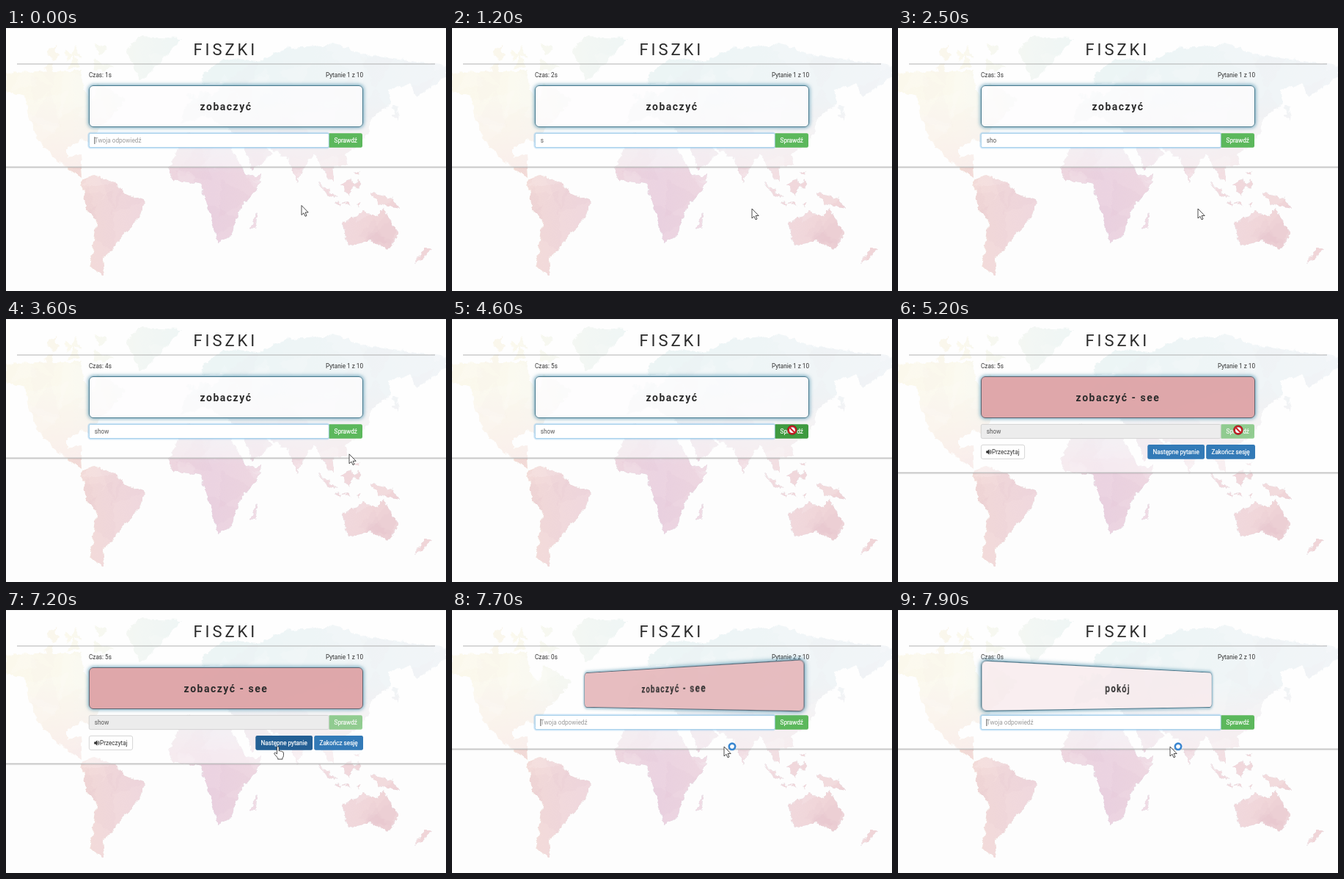
An HTML page that plays this animation: 600x358 px, repeating every 8 s.

```html
<!DOCTYPE html>
<html lang="pl">
<head>
<meta charset="utf-8">
<title>Fiszki</title>
<style>
html, body { margin: 0; width: 100%; height: 100%; overflow: hidden; background: #fdfdfd; }
#stage { position: relative; width: 600px; height: 358px; overflow: hidden; }
svg { position: absolute; left: 0; top: 0; }
text { font: 8.2px Roboto, sans-serif; fill: #333; }
.btn text { fill: #fff; stroke: #fff; stroke-width: .2; text-anchor: middle; }
#scene { position: absolute; left: 113px; top: 78.3px; width: 374px; height: 56.7px;
  perspective: 585px; perspective-origin: 50% 43px; }
#card { box-sizing: border-box; width: 100%; height: 100%; border: 1.2px solid; border-radius: 6px;
  box-shadow: 0 0 5px 1px rgba(70, 140, 170, .75); text-align: center; white-space: pre;
  font: 700 14px/56px Roboto, sans-serif; letter-spacing: 1.5px; color: #2c2c2c; }
</style>
</head>
<body>
<div id="stage">
  <svg width="600" height="358">
    <defs>
      <linearGradient id="north">
        <stop offset="0" stop-color="#f8f2d8"/><stop offset=".14" stop-color="#f7f3dc"/>
        <stop offset=".3" stop-color="#e6efe8"/><stop offset=".48" stop-color="#d8ebec"/>
        <stop offset="1" stop-color="#e4ebf1"/>
      </linearGradient>
      <linearGradient id="south">
        <stop offset=".1" stop-color="#f5ddd6"/><stop offset=".25" stop-color="#f1d9dc"/>
        <stop offset=".47" stop-color="#ebd3e1"/><stop offset=".7" stop-color="#f1dbe0"/>
        <stop offset=".85" stop-color="#f0d5d8"/>
      </linearGradient>
      <linearGradient id="fade" x2="0" y2="1">
        <stop offset=".28" stop-color="#000"/><stop offset=".55" stop-color="#fff"/>
      </linearGradient>
      <mask id="low"><rect width="600" height="358" fill="url(#fade)"/></mask>
      <clipPath id="land"></clipPath>
      <filter id="coast" x="0" y="0" width="600" height="358" filterUnits="userSpaceOnUse" color-interpolation-filters="sRGB">
        <feTurbulence type="fractalNoise" baseFrequency=".11" numOctaves="3" seed="4"/>
        <feDisplacementMap in="SourceGraphic" scale="8" xChannelSelector="R" yChannelSelector="G"/>
      </filter>
    </defs>
    <g filter="url(#coast)"><g clip-path="url(#land)">
      <rect width="600" height="358" fill="url(#north)"/>
      <rect width="600" height="358" fill="url(#south)" mask="url(#low)"/>
      <g id="facets"></g>
    </g></g>
  </svg>

  <svg width="600" height="358">
    <rect id="panel" width="600" height="189" fill="#fff" fill-opacity=".52"/>
    <path d="M0 .5H600" stroke="#f1f1f1"/>
    <g id="edge">
      <rect y="-.4" width="600" height="1.2" fill="#bbb"/>
      <rect y=".8" width="600" height="1.4" fill="#777" fill-opacity=".16"/>
    </g>
    <text x="255.5" y="37" style="font-size:22px;letter-spacing:3.9px;fill:#2b2b2b">FISZKI</text>
    <path d="M15 49H585" stroke="#a9a9a9" stroke-width=".9"/>
    <text id="timer" x="113" y="66.9"></text>
    <text id="count" x="487" y="66.9" text-anchor="end"></text>

    <rect id="glow" x="112.5" y="142.6" width="328" height="20.6" rx="3" fill="none" stroke="#66afe9" stroke-opacity=".28" stroke-width="2.4"/>
    <rect id="field" x="113.3" y="143.4" width="327" height="19.2" rx="2" stroke-width=".8"/>
    <text id="answer" x="120.8" y="156"></text>
    <path id="caret" d="M120.9 148.3V158" stroke="#333" stroke-width=".8"/>
    <g id="check" class="btn">
      <path id="checkBox" d="M440.7 143.2H483.7a2.3 2.3 0 0 1 2.3 2.3V160.5a2.3 2.3 0 0 1-2.3 2.3H440.7Z"/>
      <text x="463.2" y="155.8">Sprawdź</text>
    </g>

    <g id="extra">
      <rect x="113.4" y="171.4" width="59.2" height="19" rx="2.4" fill="#fff" stroke="#ccc" stroke-width=".8"/>
      <path d="M120.2 179.5h1.8l2.5-2.2v7.4l-2.5-2.2h-1.8Z" fill="#333"/>
      <path d="M125.3 179.4q1.2 1.6 0 3.2M126.2 178q2.3 3 0 6" fill="none" stroke="#333" stroke-width=".8"/>
      <text x="128" y="184">Przeczytaj</text>
      <g class="btn">
        <rect id="next" x="340.3" y="171" width="77.8" height="19.8" rx="2.4"/>
        <text x="379.2" y="184">Następne pytanie</text>
        <rect x="420.2" y="171" width="66.8" height="19.8" rx="2.4" fill="#337ab7"/>
        <text x="453.6" y="184">Zakończ sesję</text>
      </g>
    </g>

    <g id="cursor">
      <path id="arrow" d="M0 0V13L3 10.3 5 14.8 7 14 5.1 9.5H9.2Z" fill="#fff" stroke="#222" stroke-width=".8"/>
      <circle id="busy" cx="11" cy="-.2" r="4.2" fill="#fff" stroke="#3a86d0" stroke-width="2.6"/>
      <path id="hand" transform="translate(-6 -.5)" fill="#fff" stroke="#222" stroke-width=".8"
        d="M4.5 1.6a1.3 1.3 0 0 1 2.6 0V6.4q1.5-.8 2.4.5 1.5-.6 2.2.6 1.7-.2 1.8 1.4V12q0 2.4-1.5 4V17.6H5.7V16L1.2 10.8q-1.1-1.7.3-2.1 1.1-.2 3 1.8Z"/>
      <g id="stop" fill="none" transform="translate(.9 .2)">
        <circle r="5.3" fill="#fff" stroke="#5c1115" stroke-width="2.6"/>
        <circle r="5.3" stroke="#cf2228" stroke-width="1.9"/>
        <path d="M-3.7-3.7 3.7 3.7" stroke="#cf2228" stroke-width="2.1"/>
      </g>
    </g>
  </svg>
  <div id="scene"><div id="card"></div></div>
</div>

<script>
const $ = id => document.getElementById(id);
const set = (id, name, value) => $(id).setAttribute(name, value);
const show = (id, on) => set(id, 'visibility', on ? 'inherit' : 'hidden');
const put = (id, s) => { if ($(id).textContent !== s) $(id).textContent = s; };

let seed = 7;
const rand = (a, b) => {
  seed = seed * 16807 % 2147483647;
  return a + (b - a) * seed / 2147483647;
};

function polygon(parent, points, attrs = {}) {
  const el = document.createElementNS('http://www.w3.org/2000/svg', 'polygon');
  el.setAttribute('points', points);
  for (const k in attrs) el.setAttribute(k, attrs[k]);
  $(parent).append(el);
}

// Triangle with random corners around a centre
const triangle = (x, y, r) => {
  const a = rand(0, 6.28);
  return [0, 1, 2].map(i => {
    const b = a + i * 2.1 + rand(-.4, .4);
    return [x + r * Math.cos(b), y + r * Math.sin(b)];
  }).join(' ');
};

// Corner points only: the coast filter roughens the edges
const LAND = {
  northAmerica: '0,62 62,58 104,58 106,84 118,96 126,74 162,98 146,118 118,146 122,160 104,152 84,162 84,176 102,172 104,205 64,176 44,152 30,118 26,92 0,86',
  southAmerica: '104,207 120,200 146,210 160,224 189,235 180,262 165,276 146,300 131,314 133,337 115,325 124,262 108,244',
  greenland: '180,12 240,14 205,52 184,72 164,32',
  europe: '238,128 246,104 272,84 282,92 298,74 266,78 270,60 300,40 350,46 350,150 318,148 298,134 272,118 256,126',
  asia: '345,46 380,28 446,22 500,38 600,52 600,66 560,94 552,76 520,84 524,104 500,122 486,158 462,172 466,186 446,188 448,209 440,204 420,172 402,196 398,210 384,176 350,158 364,170 336,194 318,146',
  africa: '222,190 245,143 300,151 328,202 347,200 345,213 319,246 308,282 288,293 276,243 264,212 228,207',
  madagascar: '344,249 340,273 332,272',
  australia: '460,266 488,249 505,257 514,246 534,280 522,302 498,290 465,297',
  newGuinea: '496,224 526,232 537,245 508,239',
  borneo: '455,213 470,206 474,214 467,228',
  sumatra: '426,209 451,231 436,225',
  newZealand: '571,298 581,303 557,321'
};
Object.values(LAND).forEach(p => polygon('land', p));

function isles(n, x, y, w, h, r) {
  for (let i = 0; i < n; i++) polygon('land', triangle(x + rand(0, w), y + rand(0, h), rand(.5, 1) * r));
}
isles(9, 60, 24, 85, 34, 13);    // Arctic
isles(7, 448, 236, 38, 5, 4);    // Java
isles(6, 470, 188, 12, 36, 5);   // Philippines
isles(4, 530, 100, 4, 22, 6);    // Japan
isles(3, 250, 88, 8, 12, 6);     // Britain

for (let i = 0; i < 70; i++) {
  const light = i % 2;
  polygon('facets', triangle(rand(0, 600), rand(30, 320), rand(20, 45)),
    { fill: light ? '#fff' : '#a58', 'fill-opacity': light ? .13 : .025 });
}

// CSS "ease" curve
function ease(x) {
  if (x <= 0) return 0;
  if (x >= 1) return 1;
  const bez = (a, b, u) => 3 * a * u * (1 - u) ** 2 + 3 * b * u * u * (1 - u) + u ** 3;
  let lo = 0, hi = 1;
  for (let i = 0; i < 24; i++) {
    const mid = (lo + hi) / 2;
    if (bez(.25, .25, mid) < x) lo = mid; else hi = mid;
  }
  return bez(.1, 1, lo);
}

const LOOP = 8000, STEP = 100, FLIP = 600;
const SUBMIT = 4500, TURN = 4600, LOCK = 4700, RESET = 7600;
const KEYS = [1200, 1300, 1600, 2600];
const within = (t, a, b) => t >= a && t < b;

// Pointer moves: begin, end, x, y
const MOVES = [[100, 200, 409, 246], [2900, 3200, 470, 197], [3400, 4100, 463, 151],
  [6300, 6600, 371, 186], [6700, 7100, 406, 186], [7100, 7200, 371, 186]];

function pointer(t) {
  let x = 403, y = 241.5;
  for (const [begin, end, toX, toY] of MOVES) {
    const f = Math.min(1, Math.max(0, (t - begin) / (end - begin)));
    x += (toX - x) * f;
    y += (toY - y) * f;
  }
  return [x, y];
}

function drawCard(t) {
  const p = ease((t - TURN) / FLIP) - ease((t - RESET) / FLIP);
  const turn = p * 180, back = turn > 90;
  const mix = (a, b) => a + (b - a) * p;
  put('card', back ? 'zobaczyć - see' : t < RESET ? 'zobaczyć' : 'pokój');
  const s = $('card').style;
  s.transform = p ? `rotateY(${back ? turn - 180 : turn}deg)` : 'none';
  s.backgroundColor = `rgba(${mix(254, 222)},${mix(252, 162)},${mix(254, 165)},${mix(.75, .94)})`;
  s.borderColor = `rgb(${mix(72, 92)},${mix(122, 100)},${mix(142, 112)})`;
}

function drawForm(t, over) {
  const locked = within(t, LOCK, RESET), fresh = t >= RESET;
  const typed = fresh ? 0 : KEYS.filter(k => t >= k).length;
  const edge = locked ? 209 : 189;
  set('panel', 'height', edge);
  set('edge', 'transform', `translate(0 ${edge})`);
  put('timer', `Czas: ${fresh ? 0 : Math.min(5, 1 + Math.floor(t / 1000))}s`);
  put('count', `Pytanie ${fresh ? 2 : 1} z 10`);
  put('answer', typed ? 'show'.slice(0, typed) : 'Twoja odpowiedź');
  $('answer').style.fill = typed ? '#555' : '#999';
  show('caret', !typed && (fresh ? t - RESET : t) % 1000 < 500);
  show('glow', !locked);
  set('field', 'fill', locked ? '#ececec' : '#fff');
  set('field', 'stroke', locked ? '#ccc' : '#8fc3e4');
  set('check', 'opacity', locked ? .65 : 1);
  set('checkBox', 'fill', over === 'check' && !locked ? '#3f9a40' : '#5cb85c');
  show('extra', locked);
  set('next', 'fill', over === 'next' ? '#245f94' : '#337ab7');
}

function draw(t) {
  const [x, y] = pointer(t);
  const inside = (l, r, a, b) => x >= l && x <= r && y >= a && y <= b;
  const over = inside(440, 486, 143, 163) ? 'check'
    : within(t, LOCK, RESET) && inside(340, 418, 171, 191) ? 'next' : '';
  const kind = over === 'check' && t >= SUBMIT ? 'stop' : over ? 'hand' : 'arrow';
  set('cursor', 'transform', `translate(${x} ${y})`);
  for (const k of ['arrow', 'hand', 'stop']) show(k, k === kind);
  show('busy', t >= RESET);
  drawForm(t, over);
  drawCard(t);
}

const start = performance.now();
function tick() {
  const t = (performance.now() - start) % LOOP;
  draw(Math.floor(t / STEP) * STEP);
  requestAnimationFrame(tick);
}
tick();
</script>
</body>
</html>
```
